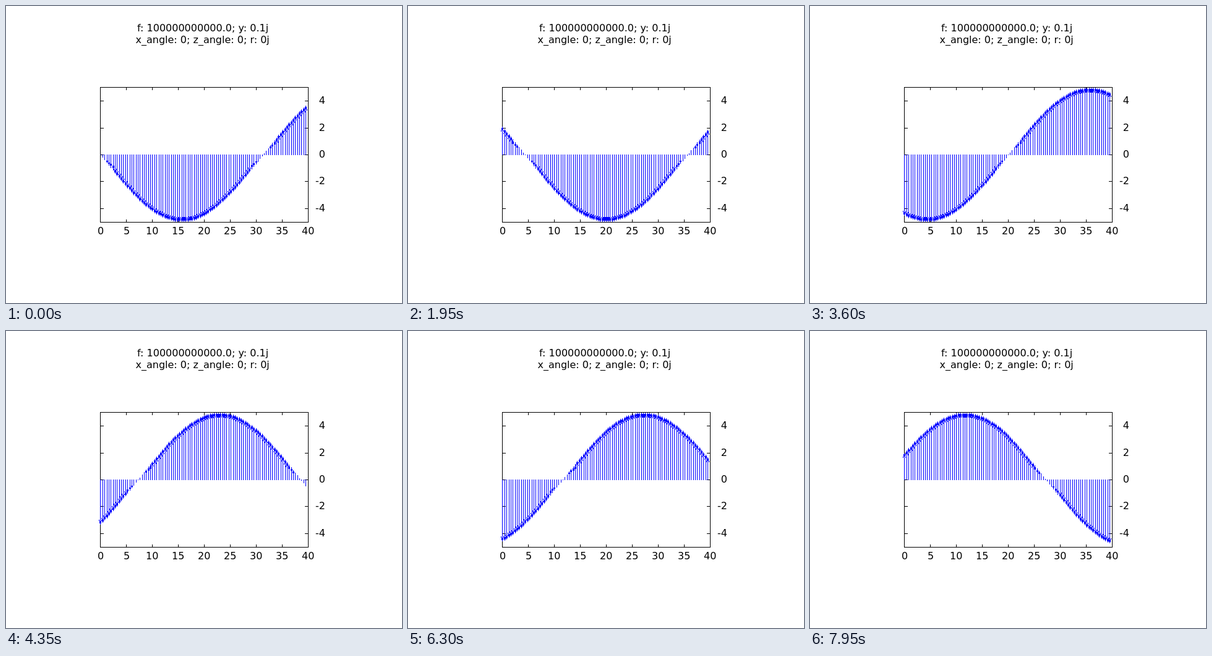
These frames come from a looping animation (640x480 px, 8000 ms). An HTML page with a canvas:

```html
<!DOCTYPE html>
<html>
<head>
<meta charset="utf-8">
<style>
html, body { margin: 0; width: 100%; height: 100%; overflow: hidden; background: #fff; }
canvas, svg { position: absolute; left: 0; top: 0; }
text { font: 16px "DejaVu Sans", sans-serif; }
</style>
</head>
<body>
<canvas id="plot" width="640" height="480"></canvas>
<svg id="labels" width="640" height="480">
  <text x="212" y="41">f: 100000000000.0; y: 0.1j</text>
  <text x="209.5" y="60">x_angle: 0; z_angle: 0; r: 0j</text>
</svg>
<script>
const LEFT = 152, RIGHT = 488, TOP = 131, BOTTOM = 349;
const MID = 320, ZERO = 240, X_UNIT = 8.4, Y_UNIT = 21.8;
const TIC = 4, MAX_HEAD = 2 * TIC;
const LOOP = 8000, STEP = 150;
const ctx = document.getElementById('plot').getContext('2d');
const labels = document.getElementById('labels');

// Whole pixels, rounded towards the middle of the plot
const toX = v => MID + Math.trunc((v - 20) * X_UNIT);
const toY = v => ZERO - Math.trunc(v * Y_UNIT);

function addLabel(value, x, y, anchor) {
  const el = document.createElementNS('http://www.w3.org/2000/svg', 'text');
  el.setAttribute('x', x);
  el.setAttribute('y', y);
  el.setAttribute('text-anchor', anchor);
  el.textContent = value;
  labels.append(el);
}

for (let v = 0; v <= 40; v += 5) addLabel(v, toX(v) + 2 - 6 * String(v).length, 369, 'start');
for (let v = -4; v <= 4; v += 2) addLabel(v, 516, toY(v) + 5, 'end');

// Filled pixel block with both corners included
function block(x1, y1, x2, y2) {
  ctx.fillRect(Math.min(x1, x2), Math.min(y1, y2), Math.abs(x2 - x1) + 1, Math.abs(y2 - y1) + 1);
}

// Steep line without smoothing, stepped from its upper end
function steepLine(x1, y1, x2, y2) {
  if (y1 > y2) [x1, y1, x2, y2] = [x2, y2, x1, y1];
  const dx = x2 - x1, dy = y2 - y1;
  for (let i = 0; i <= dy; i++) {
    const x = x1 + Math.sign(dx) * Math.round(Math.abs(dx) * i / dy);
    block(x, y1 + i, x, y1 + i);
  }
}

function drawAxes() {
  ctx.fillStyle = '#000';
  for (const y of [TOP, BOTTOM]) block(LEFT, y, RIGHT, y);
  for (const x of [LEFT, RIGHT]) block(x, TOP, x, BOTTOM);
  for (let v = 5; v < 40; v += 5) {
    const x = toX(v);
    block(x, TOP, x, TOP + TIC);
    block(x, BOTTOM - TIC, x, BOTTOM);
  }
  for (let v = -4; v <= 4; v += 2) {
    const y = toY(v);
    block(LEFT, y, LEFT + TIC + 1, y);
    block(RIGHT - TIC - 1, y, RIGHT, y);
  }
}

function drawArrow(x, tip) {
  block(x, ZERO, x, tip);
  const size = Math.min(0.3 * Math.abs(ZERO - tip), MAX_HEAD);
  const half = Math.trunc(0.26 * size);
  if (!half) return;
  const end = tip + Math.sign(ZERO - tip) * Math.trunc(0.97 * size);
  steepLine(x, tip, x - half, end);
  steepLine(x, tip, x + half, end);
}

function draw(now) {
  const phase = Math.floor(now % LOOP / STEP);
  ctx.clearRect(0, 0, 640, 480);
  drawAxes();
  ctx.fillStyle = '#00f';
  for (let i = 0; i < 100; i++) {
    const x = i * 0.4;
    drawArrow(toX(x), toY(5 * Math.sin(phase - 0.1 * x)));
  }
}

const start = performance.now();
function tick() {
  draw(performance.now() - start);
  requestAnimationFrame(tick);
}
tick();
</script>
</body>
</html>
```
